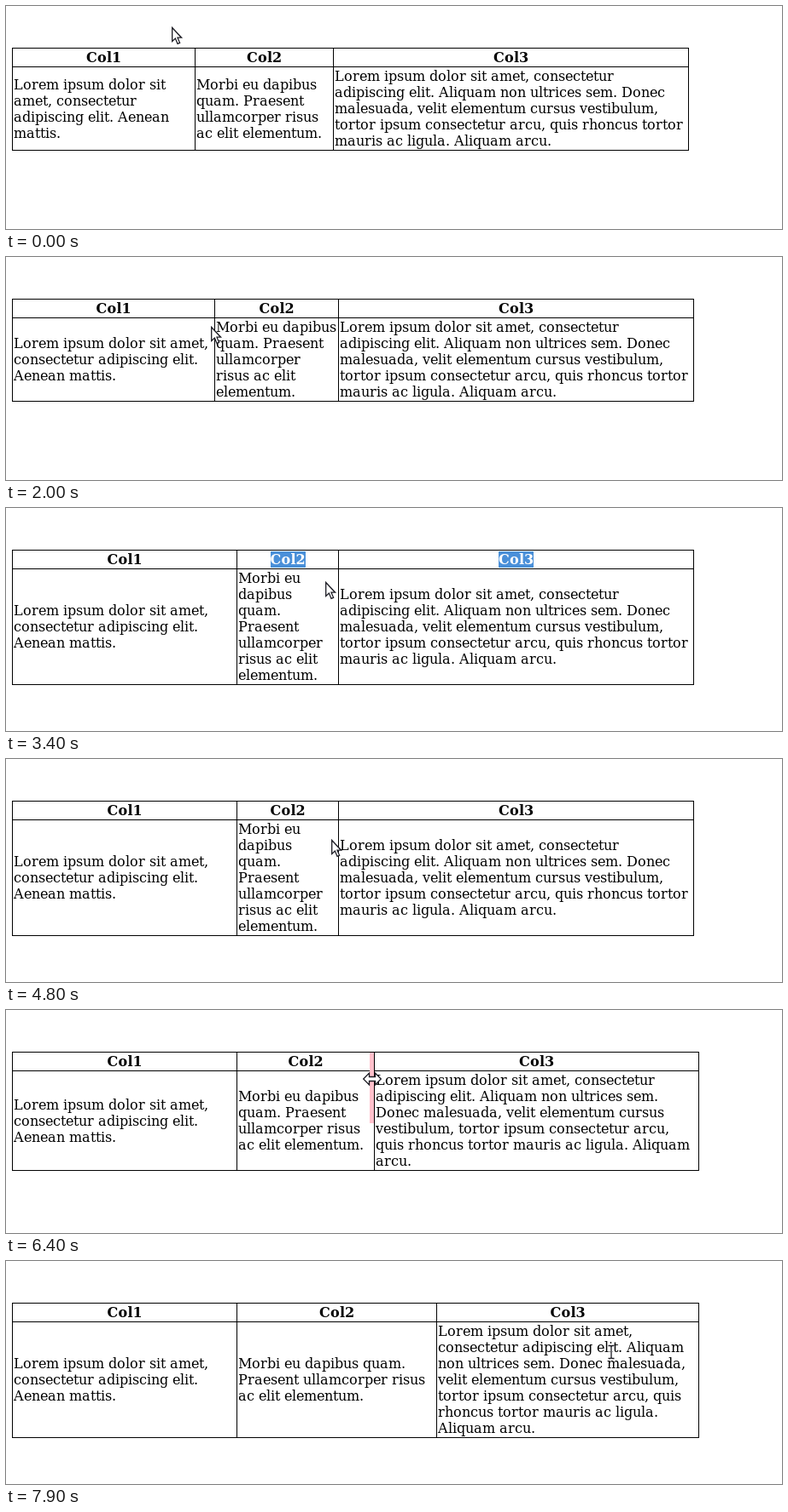
An HTML page for the animation above (8000 ms loop, 909 px wide and 262 px high).

```html
<!DOCTYPE html>
<html lang="la">
<head>
<meta charset="utf-8">
<title>Resizable columns</title>
<style>
  html, body { margin: 0; width: 100%; height: 100%; overflow: hidden; background: #fff; }
  body { position: relative; font: 16px/19px "DejaVu Serif", serif; color: #000; }
  #table {
    position: absolute; left: 7px; top: 49px; display: grid;
    border: solid #000; border-width: 1px 0 0 1px;
  }
  #table > div {
    box-sizing: border-box; min-width: 0; padding: 1px;
    border: solid #000; border-width: 0 1px 1px 0;
    display: flex; align-items: center;
  }
  #table > .head { justify-content: center; font-weight: bold; }
  .selected .pick { background: #4a90d9; color: #fff; }
  #bar { position: absolute; top: 50px; width: 5px; height: 83px; background: pink; }
  #pointer { position: absolute; left: 0; top: 0; width: 100%; height: 100%; }
  #pointer path { fill: #fff; stroke: #1c1c24; stroke-width: 1.3; }
</style>
</head>
<body>
<div id="table">
  <div class="head"><span>Col1</span></div>
  <div class="head"><span class="pick">Col2</span></div>
  <div class="head"><span class="pick">Col3</span></div>
  <div><span>Lorem ipsum dolor sit amet, consectetur adipiscing elit. Aenean mattis.</span></div>
  <div><span>Morbi eu dapibus quam. Praesent ullamcorper risus ac elit elementum.</span></div>
  <div><span>Lorem ipsum dolor sit amet, consectetur adipiscing elit. Aliquam non ultrices sem. Donec malesuada, velit elementum cursus vestibulum, tortor ipsum consectetur arcu, quis rhoncus tortor mauris ac ligula. Aliquam arcu.</span></div>
</div>
<div id="bar"></div>
<svg id="pointer">
  <path id="arrow" d="M.7 .5V16.4L4.4 13 7 19.4 9.6 18.3 7 12.2H11.6Z"/>
  <path id="resize" d="M-10.3 0L-3.5 -7V-2.5H3.5V-7L10.3 0 3.5 7V2.5H-3.5V7Z"/>
  <g id="ibeam">
    <path d="M-3.5 -7.5H-1L0 -6.5 1 -7.5H3.5M-3.5 7.5H-1L0 6.5 1 7.5H3.5M0 -6.5V6.5" style="fill:none;stroke:#fff;stroke-width:3"/>
    <path d="M-3.5 -7.5H-1L0 -6.5 1 -7.5H3.5M-3.5 7.5H-1L0 6.5 1 7.5H3.5M0 -6.5V6.5" style="fill:none"/>
  </g>
</svg>
<script>
const LOOP = 8000, STEP = 100;
const $ = id => document.getElementById(id);

// Each move: first step, last step, where it arrives.
const pointerMoves = [
  [0, 0, [194, 25], 'arrow'],
  [100, 500, [218, 72], 'arrow'],
  [600, 600, [222, 82], 'resize'],
  [800, 1000, [224, 90], 'arrow'],
  [1100, 1300, [220, 89], 'resize'],
  [1700, 1700, [218, 83], 'resize'],
  [1900, 1900, [228, 82], 'arrow'],
  [2000, 2000, [240, 82], 'arrow'],
  [2100, 2400, [261, 82], 'arrow'],
  [2800, 3400, [374, 87], 'arrow'],
  [3600, 3700, [386, 88], 'resize'],
  [3800, 3900, [390, 89], 'arrow'],
  [4200, 4300, [390, 94], 'arrow'],
  [4800, 4800, [381, 95], 'arrow'],
  [4900, 4900, [378, 95], 'arrow'],
  [5300, 5300, [386, 90], 'resize'],
  [5400, 5600, [388, 82], 'resize'],
  [6200, 6800, [484, 80], 'resize'],
  [6900, 7100, [500, 76], 'resize'],
  [7300, 7300, [500, 75], 'resize'],
  [7600, 7900, [709, 107], 'ibeam']
];
const borderMoves = [
  [0, 0, [221, 383, 799]],
  [1900, 1900, [232, 389, 805]],
  [2000, 2000, [244, 389, 805]],
  [2100, 2400, [270, 389, 805]],
  [6100, 6100, [270, 392, 811]],
  [6200, 6800, [270, 484, 811]],
  [6900, 7100, [270, 504, 811]]
];

// Gives every letter a whole-pixel advance, as in hinted text.
function snapLetters(el) {
  const pen = document.createElement('canvas').getContext('2d');
  const { fontWeight, fontSize, fontFamily } = getComputedStyle(el);
  pen.font = `${fontWeight} ${fontSize} ${fontFamily}`;
  const letters = [...el.textContent].map(char => {
    const span = document.createElement('span');
    const width = pen.measureText(char).width;
    span.textContent = char;
    // Layout rounds widths up, so stay just below the whole pixel.
    span.style.letterSpacing = Math.round(width) - width - 0.005 + 'px';
    return span;
  });
  el.replaceChildren(...letters);
}

function sample(moves, t) {
  const i = moves.findLastIndex(move => move[0] <= t);
  const [start, end, goal, kind] = moves[i];
  const from = i ? moves[i - 1][2] : goal;
  const p = Math.min(1, (t - start + STEP) / (end - start + STEP));
  return { at: goal.map((v, k) => Math.round(from[k] + (v - from[k]) * p)), kind };
}

function draw(t) {
  const { at: [x, y], kind } = sample(pointerMoves, t);
  const [a, b, c] = sample(borderMoves, t).at;
  $('table').style.gridTemplateColumns = `${a - 7}px ${b - a}px ${c - b}px`;
  $('table').classList.toggle('selected', t >= 2200 && t < 3700);

  $('bar').hidden = kind !== 'resize';
  $('bar').style.left = (x < 300 ? a : b) - 5 + 'px';

  for (const name of ['arrow', 'resize', 'ibeam']) {
    $(name).style.display = name === kind ? '' : 'none';
  }
  $(kind).setAttribute('transform', `translate(${x} ${y})`);
}

document.querySelectorAll('#table span').forEach(snapLetters);
const begin = performance.now();
function tick() {
  const t = (performance.now() - begin) % LOOP;
  draw(Math.floor(t / STEP) * STEP);
  requestAnimationFrame(tick);
}
tick();
</script>
</body>
</html>
```
